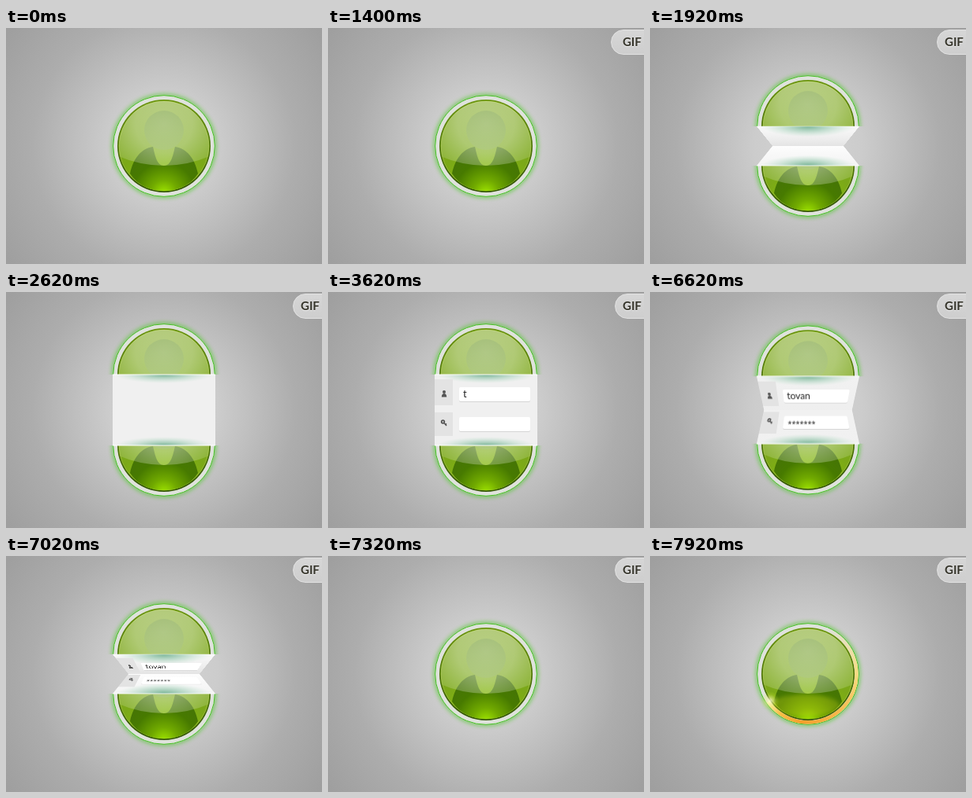
Write an HTML page that moves like this. It is 400 by 300 pixels and loops after 8000 ms.

```html
<!DOCTYPE html>
<html lang="en">
<head>
<meta charset="utf-8">
<title>Folding login badge</title>
<style>
html, body { margin: 0; width: 100%; height: 100%; overflow: hidden; }
#stage {
  position: relative; width: 400px; height: 300px; overflow: hidden;
  background: radial-gradient(circle 245px at 200px 150px,
    #d4d4d4 0, #cccccc 28%, #bfbfbf 45%, #adadad 68%, #9f9f9f 100%);
}
#stage > svg { position: absolute; left: 0; top: 0; }
#folds { position: absolute; inset: 0; perspective: 84px; perspective-origin: 200px 150px; }
.flap { position: absolute; left: 135px; width: 130px; height: 45px; background: #f0f0f0; }
.flap > svg { position: absolute; left: 0; top: 0; overflow: visible; }
#upper { transform-origin: 50% 0; }
#lower { transform-origin: 50% 100%; }
.name { font: 13px Lato, sans-serif; fill: #222; }
.stars { font: 10px "Open Sans", sans-serif; fill: #222; }
#sweep {
  position: absolute; left: 135px; top: 85px; width: 130px; height: 130px; border-radius: 50%;
  -webkit-mask: radial-gradient(circle, transparent 58.8px, #000 59.6px, #000 63.2px, transparent 64px);
  mask: radial-gradient(circle, transparent 58.8px, #000 59.6px, #000 63.2px, transparent 64px);
}
#spark {
  position: absolute; width: 24px; height: 24px; margin: -12px;
  background: radial-gradient(circle, #fffbd0dd 0, #eef09a88 25%, #d6f04033 48%, #d6f04000 70%);
}
#tab {
  position: absolute; top: 2px; height: 30px; width: 100px; box-sizing: content-box;
  border: 1px solid #e2e2e2; border-radius: 16px; background: linear-gradient(#d6d6d6, #cecece);
}
#label {
  position: absolute; top: 7px; font: 700 15px/20px Lato, sans-serif; color: #35342a;
  text-shadow: 0 1px #eee;
}
</style>
</head>
<body>
<div id="stage">
  <svg width="400" height="300">
    <defs>
      <filter id="blur" x="-20%" y="-20%" width="140%" height="140%"><feGaussianBlur stdDeviation="2.4"/></filter>
      <radialGradient id="glass" gradientUnits="userSpaceOnUse" cx="200" cy="207" r="118">
        <stop offset="0" stop-color="#a8ec00"/><stop offset=".2" stop-color="#86bc0a"/>
        <stop offset=".5" stop-color="#7ba818"/><stop offset="1" stop-color="#84aa2a"/>
      </radialGradient>
      <radialGradient id="coat" gradientUnits="userSpaceOnUse" cx="200" cy="210" r="56">
        <stop offset="0" stop-color="#a0e600"/><stop offset=".3" stop-color="#71aa00"/>
        <stop offset=".7" stop-color="#477a00"/><stop offset="1" stop-color="#457406"/>
      </radialGradient>
      <linearGradient id="face" x1="0" y1="0" x2="0" y2="1">
        <stop offset="0" stop-color="#5c8a20" stop-opacity=".62"/>
        <stop offset="1" stop-color="#7fa83c" stop-opacity=".55"/>
      </linearGradient>
      <radialGradient id="gloss" gradientUnits="userSpaceOnUse" cx="200" cy="122" r="72">
        <stop offset="0" stop-color="#fff" stop-opacity=".44"/>
        <stop offset=".5" stop-color="#fff" stop-opacity=".38"/>
        <stop offset="1" stop-color="#fff" stop-opacity=".12"/>
      </radialGradient>
      <linearGradient id="rim" x1="0" y1="0" x2="0" y2="1">
        <stop offset="0" stop-color="#6a9410"/><stop offset="1" stop-color="#2f5400"/>
      </linearGradient>
      <radialGradient id="edge">
        <stop offset="0" stop-color="#4d9c74" stop-opacity=".75"/>
        <stop offset=".5" stop-color="#6db690" stop-opacity=".36"/>
        <stop offset="1" stop-color="#a0d8b8" stop-opacity="0"/>
      </radialGradient>
      <linearGradient id="shadeUpper" x1="0" y1="0" x2="0" y2="1">
        <stop offset="0" stop-color="#fafafa"/><stop offset="1" stop-color="#e2e2e2"/>
      </linearGradient>
      <linearGradient id="shadeLower" x1="0" y1="0" x2="0" y2="1">
        <stop offset="0" stop-color="#fff"/><stop offset="1" stop-color="#f4f4f4"/>
      </linearGradient>
      <clipPath id="disc"><circle cx="200" cy="150" r="57"/></clipPath>
      <clipPath id="topHalf"><rect width="400" height="150"/></clipPath>
      <clipPath id="bottomHalf"><rect y="150" width="400" height="150"/></clipPath>
      <g id="badge">
        <circle cx="200" cy="150" r="64.5" fill="none" stroke="#4cc828" stroke-width="3.5" opacity=".75" filter="url(#blur)"/>
        <circle cx="200" cy="150" r="64.3" fill="#dfe2dc" stroke="#46c024"/>
        <circle cx="200" cy="150" r="59" fill="url(#rim)"/>
        <circle cx="200" cy="150" r="57" fill="url(#glass)" stroke="#a4c440" stroke-width=".8"/>
        <g clip-path="url(#disc)">
          <circle cx="200" cy="130" r="25" fill="url(#face)"/>
          <path d="M157 185C161 166 171 153 186 151C189 163 191 175 200 175S211 163 214 151C229 153 239 166 243 185Q229 207 200 207T157 185Z" fill="url(#coat)"/>
          <path d="M140 90H260V162Q232 175 200 175T140 162Z" fill="url(#gloss)"/>
        </g>
      </g>
    </defs>
    <g id="top"><use href="#badge" clip-path="url(#topHalf)"/></g>
    <g id="bottom"><use href="#badge" clip-path="url(#bottomHalf)"/></g>
    <ellipse id="warm" cx="196" cy="190" rx="44" ry="14" fill="#d0d81c" filter="url(#blur)"/>
  </svg>

  <div id="folds">
    <div class="flap" id="upper" style="top:105px">
      <svg width="130" height="45">
        <rect class="shade" width="130" height="45" fill="url(#shadeUpper)"/>
        <svg width="130" height="45"><ellipse class="edge" cx="65" cy="0" rx="62" fill="url(#edge)"/></svg>
        <path d="M0 0H130" stroke="#fff"/>
        <g class="slot">
          <rect y="6" width="23" height="33" fill="#e3e3e3"/>
          <g class="icon" fill="#555">
            <circle cx="12" cy="22" r="2"/>
            <path d="M8.8 28.5Q9 24 12 24T15.2 28.5Z"/>
          </g>
        </g>
        <g class="field">
          <rect x="31" y="17" width="90" height="18" rx="2" fill="#d5d5d5"/>
          <rect x="31" y="16" width="90" height="18" rx="2" fill="#fff"/>
        </g>
        <text class="name" id="user" x="36" y="29"></text>
      </svg>
    </div>
    <div class="flap" id="lower" style="top:150px">
      <svg width="130" height="45">
        <rect class="shade" width="130" height="45" fill="url(#shadeLower)"/>
        <svg width="130" height="45"><ellipse class="edge" cx="65" cy="45" rx="62" fill="url(#edge)"/></svg>
        <path d="M0 45H130" stroke="#fff"/>
        <g class="slot">
          <rect y="3" width="23" height="30" fill="#e3e3e3"/>
          <g class="icon" fill="none" stroke="#555">
            <circle cx="10.5" cy="15" r="1.8" stroke-width="1.8"/>
            <path d="M12 16.5L15 20M13.6 18.6L15 17.4" stroke-width="1.5"/>
          </g>
        </g>
        <g class="field">
          <rect x="31" y="10" width="90" height="18" rx="2" fill="#d5d5d5"/>
          <rect x="31" y="9" width="90" height="18" rx="2" fill="#fff"/>
        </g>
        <text class="stars" id="pass" x="37" y="24"></text>
      </svg>
    </div>
  </div>

  <div id="sweep"></div>
  <div id="spark"></div>
  <div id="tab"></div>
  <div id="label">GIF</div>
</div>
<script>
const LOOP = 8000, GAP = 45, USER = 'tovan', PASS = '*******';
const $ = id => document.getElementById(id);
const all = (selector, fn) => document.querySelectorAll(selector).forEach(fn);
const easeOut = p => 1 - (1 - p) ** 2;

// Share of n equal steps taken by time t; the first falls at start.
const steps = (t, start, n, ms = 100) =>
  Math.max(0, Math.min(n, Math.floor((t - start) / ms) + 1)) / n;
const typed = (text, p) => text.slice(0, Math.ceil(text.length * p));

function drawTab(t) {
  const enter = easeOut(steps(t, 100, 15, 40));
  const shrink = easeOut(steps(t, 1200, 9, 40));
  $('tab').style.left = 400 - 83 * enter + 46 * shrink + 'px';
  $('label').style.left = 455.5 - 83 * enter + .5 * shrink + 'px';
  $('tab').style.visibility = $('label').style.visibility = enter ? 'visible' : 'hidden';
}

function drawFold(t) {
  const close = steps(t, 6520, 9);
  const gap = t < 6520 ? Math.floor(GAP * steps(t, 1620, 7)) : GAP * (1 - close ** 2);
  const open = gap / GAP;
  const angle = Math.acos(open);
  $('top').setAttribute('transform', `translate(0 ${-gap})`);
  $('bottom').setAttribute('transform', `translate(0 ${gap})`);
  $('folds').style.visibility = gap > 0 ? 'visible' : 'hidden';
  $('upper').style.transform = `translateY(${GAP - gap}px) rotateX(${-angle}rad)`;
  $('lower').style.transform = `translateY(${gap - GAP}px) rotateX(${angle}rad)`;
  all('.shade', el => el.style.opacity = Math.min(1, 2 * (1 - open)));
  all('.edge', el => el.setAttribute('ry', Math.min(40, 11 / Math.max(open, .1))));
}

function drawForm(t) {
  const slide = easeOut(steps(t, 2720, 6));
  all('.slot', el => {
    el.style.opacity = slide;
    el.setAttribute('transform', `translate(${-16 * (1 - slide)} 0)`);
  });
  all('.field', el => el.style.opacity = slide);
  all('.icon', el => el.style.opacity = steps(t, 3320, 2));
  $('user').textContent = typed(USER, steps(t, 3620, 8));
  $('pass').textContent = typed(PASS, steps(t, 4520, 5));
}

function drawSweep(t) {
  const p = steps(t, 7420, 6), head = 235 * p, a = head * Math.PI / 180;
  const at = share => head * share + 'deg';
  $('sweep').style.visibility = $('spark').style.visibility = p ? 'visible' : 'hidden';
  $('sweep').style.background = `conic-gradient(#f8e8b000 ${at(.1)}, #f6dc82 ${at(.38)},
    #f6b84c ${at(.6)}, #f4a02c ${at(.8)}, #f8c048 ${at(.92)}, #fff6c0 ${at(1)}, transparent ${at(1)})`;
  $('spark').style.left = 200 + 59 * Math.sin(a) + 'px';
  $('spark').style.top = 150 - 59 * Math.cos(a) + 'px';
  $('warm').style.opacity = .3 * p;
}

const began = performance.now();
function frame() {
  const t = (performance.now() - began) % LOOP;
  drawTab(t);
  drawFold(t);
  drawForm(t);
  drawSweep(t);
  requestAnimationFrame(frame);
}
frame();
</script>
</body>
</html>
```
